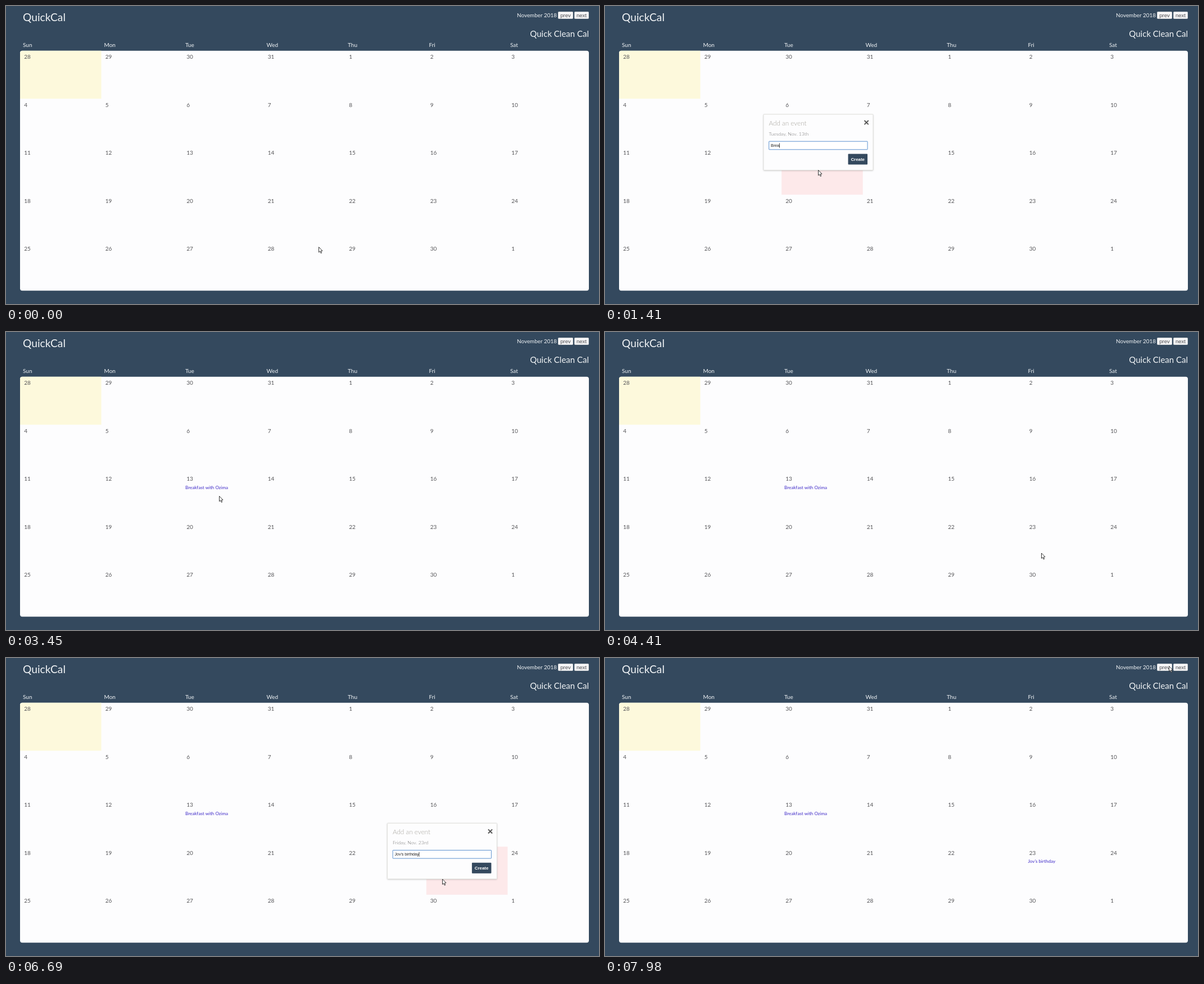
Animation, 1055 px wide and 531 px high, one loop 8 s. Source, as an HTML page with a canvas:

```html
<!DOCTYPE html>
<html lang="en">
<head>
<meta charset="utf-8">
<title>QuickCal</title>
<style>
  html, body { margin: 0; height: 100%; overflow: hidden; background: #34495e; }
  canvas { display: block; width: 100vw; height: 100vh; }
</style>
</head>
<body>
<canvas id="stage" width="1055" height="531"></canvas>
<script>
const ctx = document.getElementById('stage').getContext('2d');
const LOOP = 8000, STEP = 30;
const NAVY = '#34495e', PAPER = '#fdfdfe', LIGHT = '#f1f4f6';
const SANS = 'Lato, "Open Sans", sans-serif';
const UI = '"Liberation Sans", Arial, sans-serif';
const GRID = { x: 25, y: 79.7, w: 1012, h: 427.6 };
const CELL_W = GRID.w / 7, CELL_H = GRID.h / 5;
const DAYS = ['Sun', 'Mon', 'Tue', 'Wed', 'Thu', 'Fri', 'Sat'];

// Each typed run: text, time of its first key, time of its last key.
const EVENTS = [
  { col: 2, row: 2, date: 'Tuesday, Nov. 13th', dx: 0, dy: 0,
    open: 600, caretOff: 960, close: 3330,
    typed: [['B', 1140, 1140], ['rea', 1290, 1410], ['kfast', 1530, 1770],
            [' with ', 1920, 2400], ['Ozim', 2580, 2820], ['a', 2970, 2970]] },
  { col: 5, row: 3, date: 'Friday, Nov. 23rd', dx: 396.4, dy: 101.3,
    open: 4740, caretOff: 5100, close: 6960,
    typed: [["Jov's bi", 5430, 6150], ['rthday', 6270, 6690]] }
];

// Pointer strokes: start, end, from, to, share of easing, sag of the path.
const STROKES = [
  { t0: 0, t1: 480, from: [556.5, 429.5], to: [379.5, 292.5], ease: 0.25, sag: 3 },
  { t0: 4050, t1: 4410, from: [379.5, 292.5], to: [776.5, 394], ease: 1, sag: 12 },
  { t0: 7530, t1: 7980, from: [776.5, 394], to: [1003.5, 14.5], ease: 1, sag: 0 }
];

function text(str, x, y, size, color, family = SANS, weight = 400, align = 'left') {
  ctx.font = `${weight} ${size}px ${family}`;
  ctx.fillStyle = color;
  ctx.textAlign = align;
  ctx.fillText(str, x, y);
}

function box(x, y, w, h, radius, fill, stroke) {
  ctx.beginPath();
  ctx.roundRect(x, y, w, h, radius);
  ctx.fillStyle = fill;
  ctx.fill();
  if (!stroke) return;
  ctx.strokeStyle = stroke;
  ctx.lineWidth = 1;
  ctx.stroke();
}

function cell(col, row, color) {
  ctx.fillStyle = color;
  ctx.fillRect(GRID.x + col * CELL_W, GRID.y + row * CELL_H, CELL_W, CELL_H);
}

function drawHeader() {
  text('QuickCal', 30, 27, 19.2, LIGHT);
  text('November 2018', 980, 20, 9.9, LIGHT, SANS, 400, 'right');
  text('Quick Clean Cal', 1037, 55, 15, LIGHT, SANS, 400, 'right');
  for (const [label, x, w] of [['prev', 982.5, 26], ['next', 1011.5, 25]]) {
    box(x, 10.5, w, 12, 1, '#f6f6f7', '#d0d3d6');
    text(label, x + w / 2, 19.5, 9.5, '#4c4c50', UI, 400, 'center');
  }
  DAYS.forEach((day, i) => text(day, 30 + i * 144.5, 73, 10, LIGHT));
}

function drawDates() {
  for (let i = 0; i < 35; i++) {
    const date = i < 4 ? 28 + i : (i - 4) % 30 + 1;
    text(date, 32.3 + (i % 7) * 144.5, 94.2 + Math.floor(i / 7) * CELL_H, 10, '#555558');
  }
}

function typedText(runs, t) {
  return runs.map(([str, first, last]) => {
    if (t < first) return '';
    const share = last > first ? (t - first) / (last - first) : 1;
    return str.slice(0, 1 + Math.floor(share * (str.length - 1) + 1e-6));
  }).join('');
}

function drawDialog(event, t) {
  const value = typedText(event.typed, t);
  ctx.save();
  ctx.translate(event.dx, event.dy);
  ctx.save();
  ctx.shadowColor = 'rgba(0,0,0,.22)';
  ctx.shadowBlur = 3;
  ctx.shadowOffsetY = 1;
  box(282, 193, 195, 99.5, 1, PAPER);
  ctx.restore();
  box(282, 193, 195, 99.5, 1, PAPER, '#dededa');

  text('Add an event', 291.5, 213, 11.7, '#a5a29b', SANS, 300);
  text(event.date, 291.5, 231, 8.6, '#707070', SANS, 300);
  ctx.beginPath();
  ctx.moveTo(461.5, 204); ctx.lineTo(468.7, 211.2);
  ctx.moveTo(468.7, 204); ctx.lineTo(461.5, 211.2);
  ctx.strokeStyle = '#555';
  ctx.lineWidth = 1.9;
  ctx.stroke();

  box(291.7, 241.2, 175.3, 14.6, 0.5, '#fff', '#5d92cf');
  if (value) text(value, 295, 251, 7.1, '#222', UI);
  else text('Enter a new event', 295, 251, 7.1, '#8a8a8a', UI);
  if (value || t < event.caretOff) {
    ctx.font = `7.1px ${UI}`;
    ctx.fillStyle = '#222';
    ctx.fillRect(295 + ctx.measureText(value).width, 244.5, 0.8, 8.2);
  }

  box(432.5, 263.5, 34.5, 19, 1, NAVY);
  text('Create', 449.7, 275.7, 7.9, '#fff', UI, 700, 'center');
  ctx.restore();
}

function dialogOpacity({ open, close }, t) {
  if (t < open || t >= close + STEP) return 0;
  return t < open + STEP || t >= close ? 0.5 : 1;
}

function pointerAt(t) {
  const s = STROKES.filter(stroke => t >= stroke.t0).pop();
  const p = Math.min(1, (t - s.t0) / (s.t1 - s.t0));
  const f = p + s.ease * (p * p * (3 - 2 * p) - p);
  return [s.from[0] + (s.to[0] - s.from[0]) * f,
          s.from[1] + (s.to[1] - s.from[1]) * f + s.sag * Math.sin(Math.PI * f)];
}

function drawPointer([x, y]) {
  ctx.save();
  ctx.translate(x, y);
  ctx.fillStyle = '#fff';
  ctx.strokeStyle = '#222';
  ctx.lineWidth = 0.9;
  const arrow = new Path2D('M0 0V9.4L2.1 7.5L3.7 11L5.2 10.4L3.7 7L6.5 6.7Z');
  ctx.fill(arrow);
  ctx.stroke(arrow);
  ctx.restore();
}

function draw(t) {
  ctx.globalAlpha = 1;
  ctx.fillStyle = NAVY;
  ctx.fillRect(0, 0, 1055, 531);
  drawHeader();
  box(GRID.x, GRID.y, GRID.w, GRID.h, 4, PAPER);
  box(GRID.x, GRID.y, CELL_W, CELL_H, [4, 0, 0, 0], '#fdf9dc');

  for (const event of EVENTS) {
    ctx.globalAlpha = dialogOpacity(event, t);
    cell(event.col, event.row, '#fde9ea');
  }
  ctx.globalAlpha = 1;
  drawDates();

  for (const event of EVENTS) {
    if (t >= event.close + STEP) {
      text(typedText(event.typed, t), 30 + event.col * 144.5,
           108.8 + event.row * CELL_H, 8.1, '#3f2ac8');
    }
    const opacity = dialogOpacity(event, t);
    if (opacity) {
      ctx.globalAlpha = opacity;
      drawDialog(event, t);
      ctx.globalAlpha = 1;
    }
  }
  drawPointer(pointerAt(t));
}

const start = performance.now();
function tick() {
  const t = (performance.now() - start) % LOOP;
  draw(Math.floor(t / STEP) * STEP);
  requestAnimationFrame(tick);
}
tick();
</script>
</body>
</html>
```
